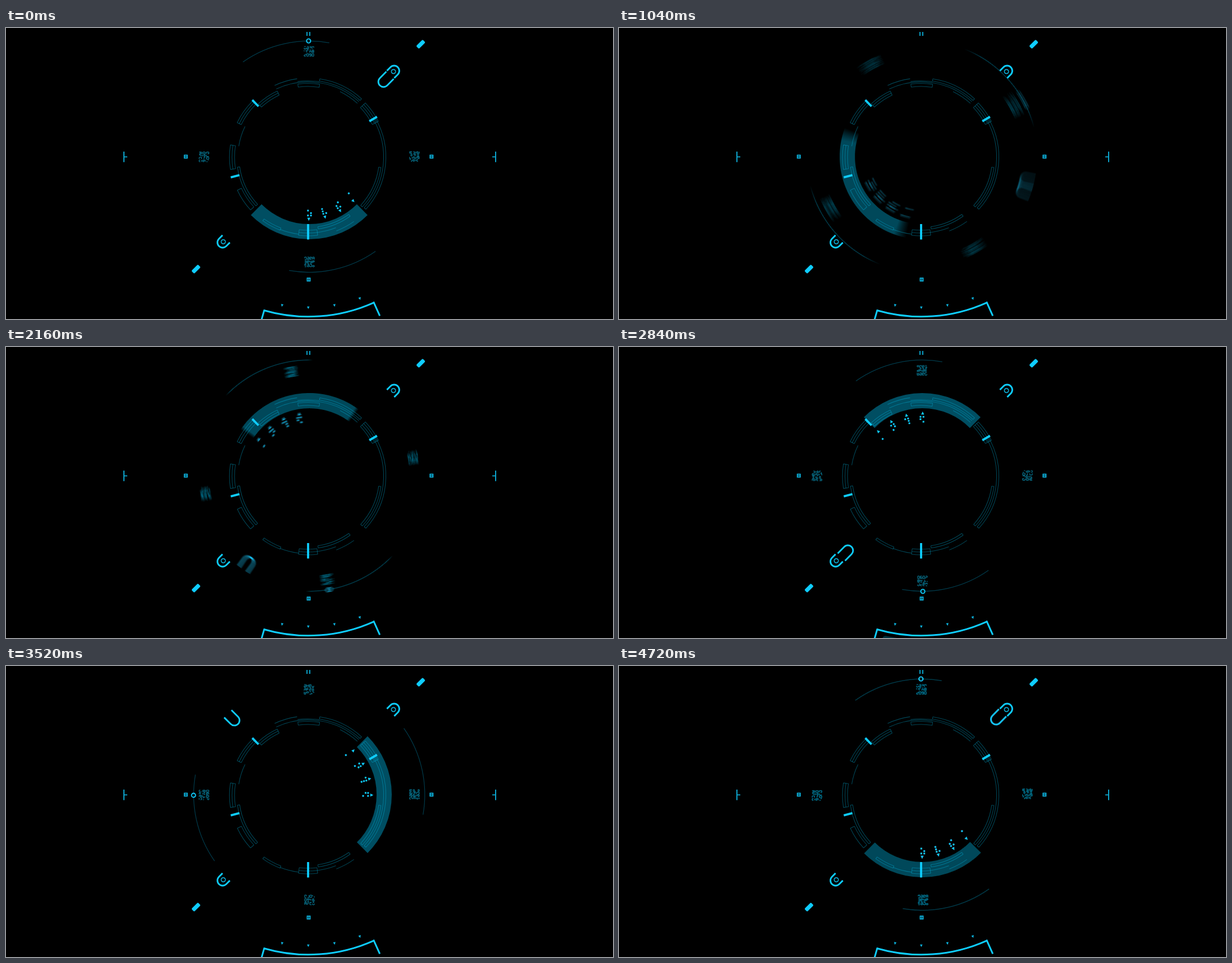
These frames come from a looping animation (1081 by 518 pixels, 4.76 s). An HTML page with a canvas:

```html
<!DOCTYPE html>
<html lang="en">
<head>
<meta charset="utf-8">
<title>Radial interface</title>
<style>
html, body { margin: 0; width: 100%; height: 100%; overflow: hidden; background: #000; }
canvas { display: block; width: 1081px; height: 518px; }
</style>
</head>
<body>
<canvas id="stage" width="1081" height="518"></canvas>
<script>
const g = document.getElementById('stage').getContext('2d');
const LOOP = 4760, STEP = 40, SHUTTER = 22, TURN = 640;
const CYAN = '#0fcdff', SOFT = '#0db5e0', CODE = '#087c99', FAINT = '#003a4a';
const LINE = 'rgba(0,190,235,.36)', BAND = '#004e62', PILL = '#00303d';

// [start time, degrees]
const turns = [[689, 89.5], [1730, 90.5], [2890, 90], [4128, 90]];
const pillMoves = [[1100, -20.4], [1800, 31], [2900, -10.6]];

const rad = d => d * Math.PI / 180;

function ease(x, a = .77) {
  if (x <= 0 || x >= 1) return Math.min(1, Math.max(0, x));
  let lo = 0, hi = 1, u = .5;
  for (let i = 0; i < 24; i++) {
    u = (lo + hi) / 2;
    const v = 1 - u;
    const at = 3 * u * v * v * a + 3 * u * u * v * (1 - a) + u * u * u;
    if (at < x) lo = u; else hi = u;
  }
  return u * u * (3 - 2 * u);
}

function travel(moves, t) {
  return moves.reduce((sum, [start, size]) => sum + size * ease((t - start) / TURN), 0);
}

// draws around a centre, turned by an angle; +x points outward
function around(x, y, angle, paint) {
  g.save();
  g.translate(x, y);
  g.rotate(rad(angle));
  paint();
  g.restore();
}

function stroke(color, width) {
  g.strokeStyle = color;
  g.lineWidth = width;
  g.stroke();
}

function arc(r, from, to, color, width) {
  g.beginPath();
  g.arc(0, 0, r, rad(from), rad(to));
  stroke(color, width);
}

function line(x0, y0, x1, y1, color, width) {
  g.beginPath();
  g.moveTo(x0, y0);
  g.lineTo(x1, y1);
  stroke(color, width);
}

function spoke(angle, r0, r1, color, width) {
  const c = Math.cos(rad(angle)), s = Math.sin(rad(angle));
  line(c * r0, s * r0, c * r1, s * r1, color, width);
}

function circle(x, r, color, width) {
  g.beginPath();
  g.arc(x, 0, r, 0, 7);
  stroke(color, width);
}

function block(x, y, w, h, corner, color) {
  g.beginPath();
  g.roundRect(x - w / 2, y - h / 2, w, h, corner);
  g.fillStyle = color;
  g.fill();
}

// a U on the +x axis; a negative arm opens inward
function hook(x, arm) {
  const r = 9.2;
  g.beginPath();
  g.moveTo(x + arm, -r);
  g.lineTo(x, -r);
  g.arc(x, 0, r, -Math.PI / 2, Math.PI / 2, arm > 0);
  g.lineTo(x + arm, r);
  stroke(CYAN, 2.9);
}

function tip(x, size, color) {
  g.beginPath();
  g.moveTo(x - size, -size);
  g.lineTo(x + size, 0);
  g.lineTo(x - size, size);
  g.fillStyle = color;
  g.fill();
}

// three rows of tiny segment characters
function makeCode(seed) {
  const rnd = () => (seed = seed * 16807 % 2147483647) / 2147483647;
  const path = new Path2D(), w = 3, h = 2.2;
  const bar = (x, y, dx, dy) => {
    if (rnd() > .7) return;
    path.moveTo(x, y);
    path.lineTo(x + dx, y + dy);
  };
  for (let y = -8.5; y < 8; y += 6.4) for (let x = -8.5; x < 8; x += 4.7) {
    for (let k = 0; k < 3; k++) bar(x, y + k * h, w, 0);
    for (let k = 0; k < 4; k++) bar(x + k % 2 * w, y + (k >> 1) * h, 0, h);
  }
  return path;
}
const codes = [0, 1, 2, 3].map(i => makeCode(4127 + i * 9011));

// left and right dot of three rows, for each digit
const digits = ['100111', '101011', '011011', '010000'];

function drawDigit(pattern) {
  [...pattern].forEach((on, k) => {
    if (on === '1') block(96 + (k >> 1) * 4.4, k % 2 ? -3.8 : 1.5, 3, 3, 0, CYAN);
  });
  tip(111.5, 2.7, CYAN);
}

function drawRotor(angle) {
  around(540, 229, angle, () => {
    arc(133.5, 45, 135, BAND, 27);
    arc(205.8, -125, -80, FAINT, 1.2);
    arc(205.8, 55, 100, FAINT, 1.2);
    around(0, 0, -90.3, () => circle(206, 3.6, CYAN, 1.9));
    around(0, 0, -45.2, () => hook(187.8, 16.5));
    digits.forEach((d, i) => around(0, 0, 90.4 - i * 15.1, () => drawDigit(d)));
    codes.forEach((code, i) => around(0, 0, i * 90, () => {
      g.translate(-.5, -187.5);
      g.strokeStyle = CODE;
      g.lineWidth = 1.1;
      g.stroke(code);
    }));
  });
}

function drawBlurred(t) {
  const at = shift => travel(turns, t + SHUTTER * shift);
  if (at(.5) - at(-.5) < .15) return drawRotor(at(0));
  const n = 18;
  g.save();
  g.globalCompositeOperation = 'lighter';
  g.globalAlpha = 1 / n;
  for (let i = 0; i < n; i++) drawRotor(at((i + .5) / n - .5));
  g.restore();
}

// concentric lines closed by a cap at each end
function band(from, to, r, count = 1, gap = 4) {
  const inner = r - gap * (count - 1);
  for (let i = 0; i < count; i++) arc(r - gap * i, from, to, LINE, 1.1);
  if (count > 1) [from, to].forEach(a => spoke(a, inner, r, LINE, 1.1));
}

function drawRing() {
  around(538, 230, 0, () => {
    // top
    band(-115, -47.5, 134);
    band(-115, -98, 141);
    band(-98, -81.5, 136);
    band(-81.5, -47.5, 141, 2);
    band(-98, -81, 131.5, 2, 5.5);
    band(-64, -47.5, 130);
    // left
    band(-133, -115, 130, 3);
    band(-154, -135, 140.5, 3);
    band(-171, -154, 125);
    band(171, 189, 140, 3, 4.5);
    band(137, 172, 127, 2);
    band(137.5, 155, 139, 2, 8);
    // bottom
    band(111, 125.5, 139, 2);
    band(97, 111, 138);
    band(83, 97, 140, 3, 5);
    band(54.5, 82, 129, 2);
    band(54.5, 69, 140.5);
    band(68.5, 83, 135);
    // right
    band(8, 42.5, 131, 2);
    band(-30, 42, 138.5, 2);
    band(-43.5, -27, 140.5, 4);

    [-134.3, -30.4, 165.4].forEach(a => spoke(a, 126.5, 142.3, CYAN, 3.8));
    spoke(90, 119, 146.5, CYAN, 3.8);
  });
}

function drawScale(t) {
  const from = 65.8, to = 106, r = 284.8;
  around(538.3, 229, 0, () => {
    g.save();
    g.beginPath();
    g.moveTo(0, 0);
    g.arc(0, 0, 340, rad(from), rad(to));
    g.clip();
    around(0, 0, 90 + travel(pillMoves, t), () => {
      block(301.5, 0, 19, 29, 5, PILL);
      for (let k = 0; k < 6; k++) block(299 + k % 3 * 3.4, 3 - (k >> 1) * 3.4, 2.3, 2.3, 0, CYAN);
    });
    g.restore();

    arc(r, from, to, CYAN, 3);
    [from, to].forEach(a => spoke(a, r - 1.5, r + 26, CYAN, 3));
    for (let a = 70; a <= 100; a += 10) around(0, 0, a, () => tip(269, 2.3, SOFT));
  });
}

function drawFixed() {
  [-45, 135].forEach(a => around(538.5, 229, a, () => {
    hook(216, -9);
    circle(214.3, 3.7, SOFT, 1.6);
    block(283, 0, 16.5, 7.2, 2, CYAN);
  }));
  for (let a = 0; a <= 180; a += 90) around(539, 229, a, () => {
    g.strokeStyle = SOFT;
    g.lineWidth = 1.7;
    g.strokeRect(216.2, -2.6, 5.2, 5.2);
    line(216, 0, 221, 0, SOFT, 1.5);
  });
  [-2.5, 2.5].forEach(dx => block(538.5 + dx, 10.5, 2, 7, 0, '#0a9cc2'));
}

function drawMarks() {
  [0, 180].forEach(a => around(541, 229.4, a, () => {
    line(331, -9.3, 331, 9.3, '#0ca4cc', 2);
    line(331, 0, 325, 0, '#0ca4cc', 1.8);
  }));
}

function drawOuterArc(t) {
  const level = 1 - Math.abs(t - 1760) / 120;
  if (level <= 0) return;
  g.globalAlpha = level;
  around(540, 229, -9.6, () => arc(309.5, -2.2, 2.2, FAINT, 1.1));
  g.globalAlpha = 1;
}

function draw(t) {
  g.fillStyle = '#000';
  g.fillRect(0, 0, 1081, 518);
  drawBlurred(t);
  drawRing();
  drawOuterArc(t);
  drawScale(t);
  drawFixed();
  if (Math.round(t / STEP) % 2 === 0) drawMarks();
}

const begin = performance.now();
function tick() {
  const t = Math.max(0, performance.now() - begin) % LOOP;
  draw(Math.floor(t / STEP) * STEP);
  requestAnimationFrame(tick);
}
tick();
</script>
</body>
</html>
```
